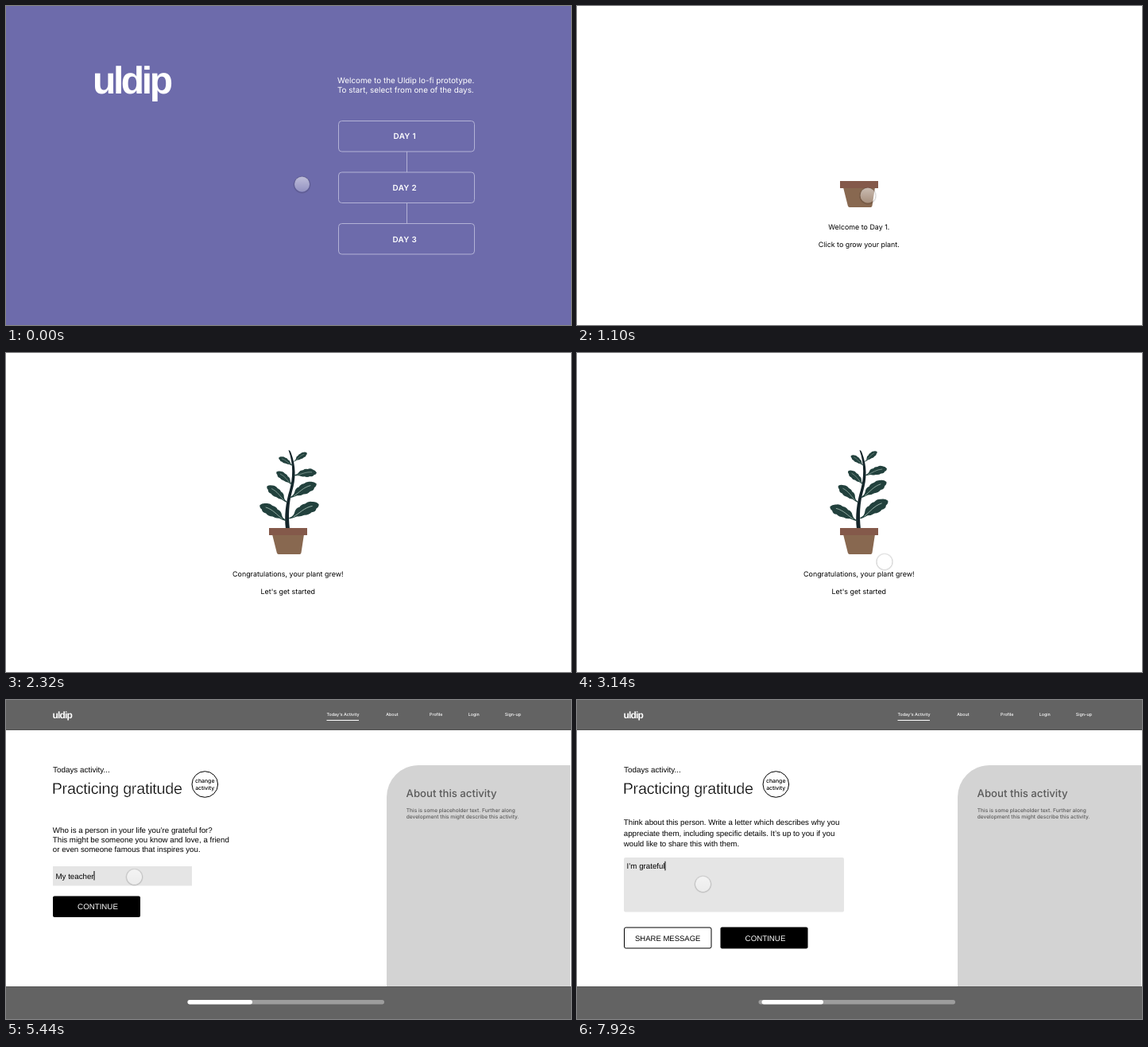
Animation of 711 by 401 pixels, one loop 8000 ms. Source, as an HTML page:

```html
<!DOCTYPE html>
<html lang="en">
<head>
<meta charset="utf-8">
<title>Prototype walkthrough</title>
<style>
  html, body { margin: 0; width: 100%; height: 100%; overflow: hidden; background: #fff; }
  svg { display: block; width: 100vw; height: 100vh; }
  text { font-family: "Liberation Sans", Arial, sans-serif; font-size: 9.72px; white-space: pre; text-rendering: geometricPrecision; }
  .inter, .inter text { font-family: Inter, sans-serif; }
  .mid { text-anchor: middle; }
  .logo { font-weight: 700; fill: #fff; }
  .intro text { font-size: 9.88px; fill: #fff; }
  .days text { font-size: 9.9px; font-weight: 600; letter-spacing: .3px; fill: #fff; text-anchor: middle; }
  .days rect, .days path { fill: none; stroke: #b3b2d6; }
  .grow text { font-size: 8.89px; text-anchor: middle; }
  .nav text { font-size: 5.35px; font-weight: 500; fill: #fff; }
  .about text { font-size: 6.55px; font-weight: 500; fill: #5a5a5a; }
  .about .head { font-size: 13.2px; }
  .pill text { font-size: 6.9px; font-weight: 500; text-anchor: middle; }
  .title { font-size: 19.75px; letter-spacing: -.25px; stroke: #fff; stroke-width: .4px; }
  .hint { fill: #8b8b8b; }
</style>
</head>
<body>
<svg id="stage" viewBox="0 0 711 401" preserveAspectRatio="none">
  <defs>
    <linearGradient id="glass" x2="0" y2="1">
      <stop offset="0" stop-color="#fff" stop-opacity=".56"/>
      <stop offset="1" stop-color="#fff" stop-opacity=".26"/>
    </linearGradient>
    <radialGradient id="shade">
      <stop offset=".78" stop-color="#000" stop-opacity="0"/>
      <stop offset=".84" stop-color="#000" stop-opacity=".17"/>
      <stop offset="1" stop-color="#000" stop-opacity="0"/>
    </radialGradient>
    <g id="leaf">
      <path fill="#22413d" d="M0 0C.1 .02 .17 -.02 .22 -.08Q.3 -.19 .42 -.17Q.5 -.23 .62 -.2Q.74 -.24 .84 -.17Q.96 -.13 1 -.02Q.97 .06 .88 .07Q.82 .16 .7 .12Q.58 .17 .46 .11Q.34 .12 .24 .06Q.12 .06 0 .04Z"/>
      <path fill="none" stroke="#b4cbc0" stroke-width=".018" d="M.14 .03C.35 0 .55 -.1 .8 -.05"/>
    </g>
  </defs>

  <g id="home">
    <rect width="711" height="401" fill="#6d6bab"/>
    <text class="logo" x="109" y="110" style="font-size:48px;letter-spacing:-3.4px">uldip</text>
    <g class="inter intro">
      <text x="417" y="97.3">Welcome to the Uldip lo-fi prototype.</text>
      <text x="417" y="109.2">To start, select from one of the days.</text>
    </g>
    <g class="inter days">
      <path d="M504.5 183V209M504.5 248V273"/>
      <rect x="418.500" y="144.500" width="171" height="38.500" rx="4"/>
      <rect x="418.500" y="209" width="171" height="38.500" rx="4"/>
      <rect x="418.500" y="273.500" width="171" height="38.500" rx="4"/>
      <text x="501.800" y="167.300">DAY 1</text>
      <text x="501.800" y="232.200">DAY 2</text>
      <text x="501.800" y="296.800">DAY 3</text>
    </g>
  </g>

  <g id="garden" class="inter grow">
    <rect width="711" height="401" fill="#fff"/>
    <g id="plant">
      <path fill="#14252a" d="M352 221C350 205 352 188 357 172C361 158 362 140 355.5 122Q357.5 122 358.5 125C365 142 365 158 360 174C356 188 355 205 357 221Z"/>
      <g id="leaves"></g>
    </g>
    <path fill="#886850" d="M335 228H375L371.500 251Q371.200 253 369.500 253H343Q341.300 253 340.800 251Z"/>
    <rect x="331" y="220" width="48" height="9" fill="#84594a"/>
    <text id="line1" x="354.800" y="281.400"></text>
    <text id="line2" x="354.800" y="302.700"></text>
  </g>

  <g id="activity">
    <rect width="711" height="401" fill="#fff"/>
    <path fill="#d3d3d3" d="M479 360V122A40 40 0 0 1 519 82H710V360Z"/>
    <rect width="711" height="38" fill="#636363"/>
    <rect y="37" width="711" height="1" fill="#525252"/>
    <rect y="360" width="711" height="41" fill="#636363"/>
    <rect y="360" width="711" height="1" fill="#565656"/>
    <text class="logo" x="58.500" y="23" style="font-size:12px;letter-spacing:-.85px">uldip</text>
    <g class="inter nav">
      <text x="403.500" y="19.600">Today's Activity</text>
      <text x="478.200" y="19.600">About</text>
      <text x="533" y="19.600">Profile</text>
      <text x="581.700" y="19.600">Login</text>
      <text x="627.700" y="19.800">Sign-up</text>
      <rect x="403.500" y="25" width="40.500" height="1" fill="#fff"/>
    </g>
    <g class="inter about">
      <text class="head" x="503.600" y="122">About this activity</text>
      <text x="503.800" y="141.300">This is some placeholder text. Further along</text>
      <text x="503.800" y="149.400">development this might describe this activity.</text>
    </g>
    <text x="59" y="91.200" style="font-size:9.9px">Todays activity...</text>
    <text class="title" x="57.700" y="118">Practicing gratitude</text>
    <g class="inter pill">
      <circle cx="250.300" cy="106" r="16.300" fill="#fff" stroke="#000"/>
      <text x="250.200" y="104.400">change</text>
      <text x="250.200" y="113">activity</text>
    </g>
    <rect x="228.500" y="377" width="247.500" height="5.500" rx="2.750" fill="#9d9d9d"/>
    <rect id="bar" y="377" height="5.500" rx="2.750" fill="#fff"/>

    <g id="who">
      <text x="58.800" y="167.400">Who is a person in your life you’re grateful for?</text>
      <text x="58.800" y="179.200">This might be someone you know and love, a friend</text>
      <text x="58.800" y="190.900">or even someone famous that inspires you.</text>
      <rect x="59" y="209" width="175" height="24.500" fill="#e5e5e5"/>
      <rect x="59" y="246.500" width="110" height="26.500" rx="2" fill="#000"/>
      <text class="mid" x="115.500" y="263.400" fill="#fff">CONTINUE</text>
    </g>
    <g id="letter">
      <text x="58.800" y="157">Think about this person. Write a letter which describes why you</text>
      <text x="58.800" y="170.600">appreciate them, including specific details. It’s up to you if you</text>
      <text x="58.800" y="184.200">would like to share this with them.</text>
      <rect x="59" y="198" width="277" height="68.500" rx="2" fill="#e5e5e5"/>
      <rect x="59.500" y="286" width="109.500" height="26" rx="2" fill="#fff" stroke="#000"/>
      <text class="mid" x="114.200" y="302.500" style="font-size:9.5px">SHARE MESSAGE</text>
      <rect x="180.500" y="285.500" width="110" height="27" rx="2" fill="#000"/>
      <text class="mid" x="237" y="302.500" fill="#fff">CONTINUE</text>
    </g>
    <text id="entry" x="62.500"></text>
    <rect id="caret" width="1" height="11.500"/>
  </g>

  <g id="cursor">
    <circle cy=".6" r="11.500" fill="url(#shade)"/>
    <circle r="9.500" fill="url(#glass)"/>
  </g>
</svg>
<script>
const LOOP = 8000, DAY = 280, GREW = 1180, START = 3160, NEXT = 5720;
const $ = id => document.getElementById(id);
const show = (id, on) => $(id).setAttribute('visibility', on ? 'inherit' : 'hidden');
const clamp = v => Math.max(0, Math.min(1, v));
const ease = p => p * p * (3 - 2 * p);

// time, x, y, opacity
const moves = [
  [0, 372.5, 224, 1], [240, 469, 160, 1], [640, 469, 160, 1],
  [1100, 366, 238, 1], [1300, 366, 238, 1], [1400, 366, 238, 0],
  [2380, 366, 238, 0], [2560, 370, 243, 1], [3100, 387, 262, 1],
  [3520, 387, 262, 1], [3840, 167, 216.3, 1], [5380, 167, 216.3, 1],
  [5640, 128, 258, 1], [5780, 128, 258, 1], [6120, 149, 235, 1],
  [6240, 158.5, 231, 1], [LOOP, 158.5, 231, 1]
];

// base x, base y, reach x, reach y, sway in degrees
const leaves = [
  [353, 210, -34, -18, -3], [356, 207, 38, -16, -7],
  [354, 187, -26, -19, 1], [357, 181, 34, -16, -4],
  [361, 165, -21, -15, 3], [362, 153, 29, -2, -10],
  [361, 141, -18, -9, 8], [362, 136, 17, -10, -6]
].map(([x, y, dx, dy, sway]) => {
  const el = document.createElementNS('http://www.w3.org/2000/svg', 'use');
  el.setAttribute('href', '#leaf');
  $('leaves').append(el);
  const len = Math.hypot(dx, dy), flip = dx < 0 ? -len : len;
  const angle = Math.atan2(dy, dx) * 180 / Math.PI;
  return k => el.setAttribute('transform',
    `translate(${x} ${y}) rotate(${angle + sway * k}) scale(${len} ${flip})`);
});

const fields = {
  who: {
    text: 'My teacher', hint: 'Enter their name here', base: 224.6, caret: 215,
    keys: [4360, 4440, 4520, 4600, 4700, 4880, 4960, 5040, 5100, 5180],
    focus: 3860, off: [[4160, 4360]]
  },
  letter: {
    text: 'I’m grateful', hint: 'Type your answer here', base: 211.5, caret: 202.8,
    keys: [6540, 6920, 7080, 7180, 7320, 7400, 7480, 7560, 7640, 7700, 7780, 7920],
    focus: 6260, off: [[6440, 6540], [6720, 6820]]
  }
};

function drawField(f, t) {
  const count = f.keys.filter(k => k <= t).length;
  const entry = $('entry');
  entry.textContent = count ? f.text.slice(0, count) : f.hint;
  entry.setAttribute('class', count ? '' : 'hint');
  entry.setAttribute('y', f.base);
  $('caret').setAttribute('x', 62.4 + (count ? entry.getComputedTextLength() : 0));
  $('caret').setAttribute('y', f.caret);
  show('caret', t >= f.focus && !f.off.some(([a, b]) => t >= a && t < b));
}

function drawGarden(t) {
  const grown = t >= GREW;
  $('line1').textContent = grown ? 'Congratulations, your plant grew!' : 'Welcome to Day 1.';
  $('line2').textContent = grown ? "Let's get started" : 'Click to grow your plant.';
  show('plant', grown);
  const size = 1 - (1 - clamp((t - GREW) / 320)) ** 3;
  $('plant').setAttribute('transform', `translate(355 220) scale(${size}) translate(-355 -220)`);
  const k = (1 - Math.cos((t - 2320) / 820 * Math.PI)) / 2;
  leaves.forEach(set => set(k));
}

function drawCursor(t) {
  const i = moves.findIndex((m, n) => n && t <= m[0]);
  const a = moves[i - 1], b = moves[i];
  const p = ease((t - a[0]) / (b[0] - a[0]));
  const [x, y, o] = [1, 2, 3].map(n => a[n] + (b[n] - a[n]) * p);
  $('cursor').setAttribute('transform', `translate(${x} ${y})`);
  $('cursor').setAttribute('opacity', o);
}

function draw(t) {
  const active = t >= START, second = t >= NEXT;
  show('home', t < DAY);
  show('garden', t >= DAY && !active);
  show('activity', active);
  if (active) {
    show('who', !second);
    show('letter', second);
    const left = second ? 232.5 : 228.5;
    $('bar').setAttribute('x', left);
    $('bar').setAttribute('width', 310 - left);
    drawField(second ? fields.letter : fields.who, t);
  } else {
    show('caret', false);
    drawGarden(t);
  }
  drawCursor(t);
}

show('letter', false);
const begin = performance.now();
function tick() {
  draw((performance.now() - begin) % LOOP);
  requestAnimationFrame(tick);
}
tick();
</script>
</body>
</html>
```
